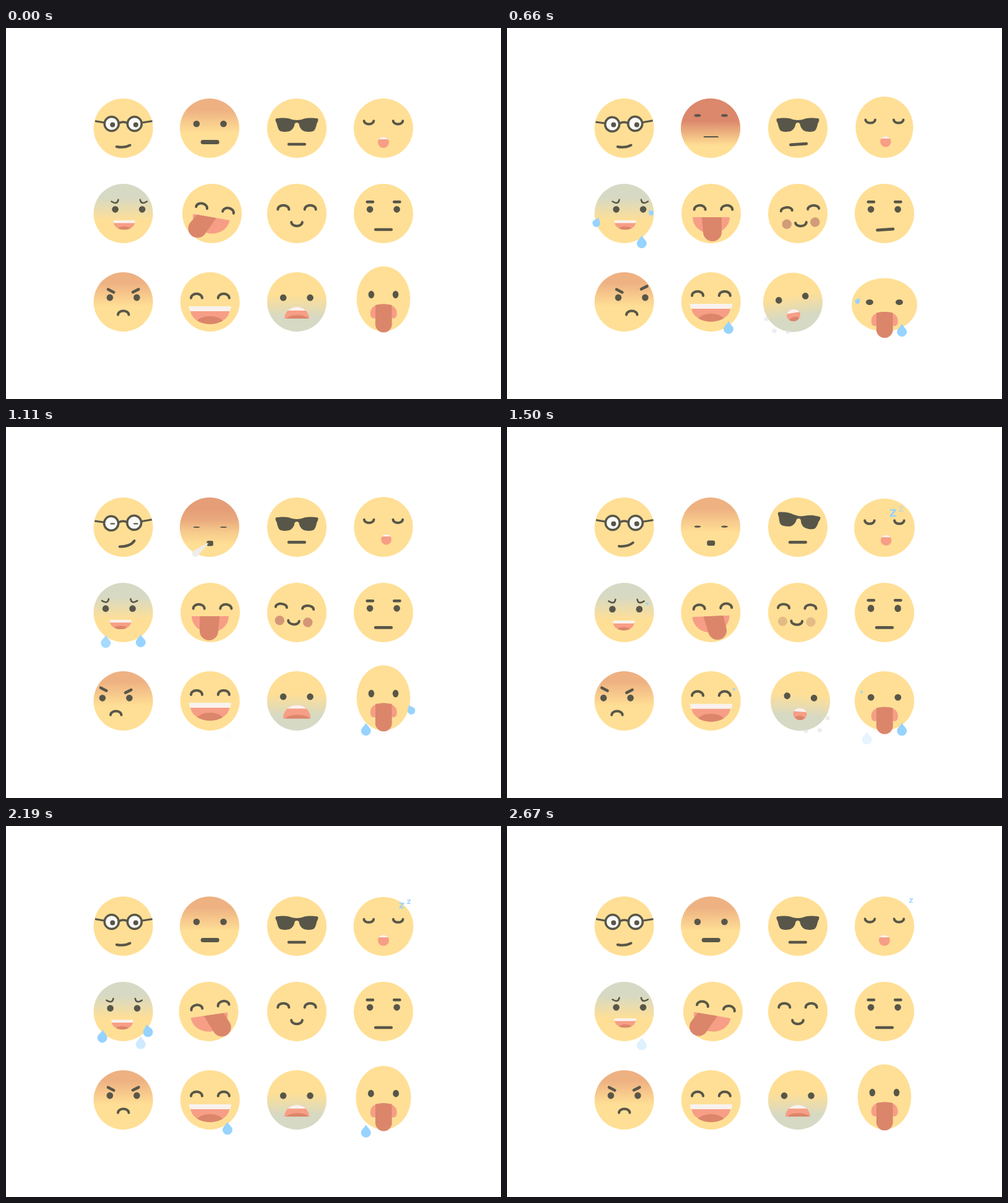
An HTML page with a canvas that plays this animation: 800x600 px, repeating every 2.7 s.

```html
<!DOCTYPE html>
<html lang="en">
<head>
<meta charset="utf-8">
<title>Twelve faces</title>
<style>
html, body { margin: 0; width: 100%; height: 100%; overflow: hidden; background: #fff; }
canvas { display: block; width: 800px; height: 600px; }
</style>
</head>
<body>
<canvas id="stage" width="800" height="600"></canvas>
<script>
const g = document.getElementById('stage').getContext('2d');
const LOOP = 2700, STEP = 30, PI = Math.PI;
const SKIN = '#ffdf95', INK = '#585649', PINK = '#f79e86', TONGUE = '#db866b',
  TEETH = '#f9f2ee', WATER = '#96d3ff', ORANGE = '#eeb182', RED = '#db886c', GREEN = '#d6d9c4';

const clamp = u => Math.min(1, Math.max(0, u));
const ramp = (t, a, b) => { const u = clamp((t - a) / (b - a)); return u * u * (3 - 2 * u); };
// Eases 0 to 1 over a..b, stays, and eases back over c..d.
const hold = (t, a, b, c, d) => ramp(t, a, b) - ramp(t, c, d);
const wave = (t, period) => Math.cos(2 * PI * t / period);

function at(x, y, rot, draw, scale = 1) {
  g.save();
  g.translate(x, y);
  g.rotate(rot);
  g.scale(scale, scale);
  draw();
  g.restore();
}
function faded(alpha, draw) {
  g.globalAlpha = clamp(alpha);
  draw();
  g.globalAlpha = 1;
}
function oval(x, y, rx, ry, fill) {
  g.beginPath();
  g.ellipse(x, y, rx, ry, 0, 0, 2 * PI);
  g.fillStyle = fill;
  g.fill();
}
function shape(d, fill) {
  g.fillStyle = fill;
  g.fill(new Path2D(d));
}
function line(d, width = 4, cap = 'round') {
  g.strokeStyle = INK;
  g.lineWidth = width;
  g.lineCap = cap;
  g.stroke(new Path2D(d));
}
function pill(x, y, w, h, r, fill) {
  g.beginPath();
  g.roundRect(x, y, w, h, r);
  g.fillStyle = fill;
  g.fill();
}
function arch(x, y, rx, ry, up) {
  g.beginPath();
  g.ellipse(x, y, rx, ry, 0, PI, 0, !up);
  g.strokeStyle = INK;
  g.lineWidth = 4;
  g.lineCap = 'round';
  g.stroke();
}
function eyes(x, y, gap = 21.75, rx = 5.3, ry = 5.4) {
  for (const side of [-1, 1]) oval(x + side * gap, y, rx, ry, INK);
}
function fade(y0, y1, from, to) {
  const f = g.createLinearGradient(0, y0, 0, y1);
  f.addColorStop(0, from);
  f.addColorStop(1, to);
  return f;
}
const ball = (x, y, fill = SKIN) => oval(x, y, 48, 48, fill);

function bowl(x, y, rx, ry, tx, ty) {
  g.save();
  g.beginPath();
  g.ellipse(x, y, rx, ry, 0, 0, PI);
  g.clip();
  oval(x, y, rx, ry, PINK);
  oval(x, y + ry, tx, ty, TONGUE);
  g.restore();
}

// A bead of sweat grows at the temple, slides round the cheek, then falls and fades.
function sweat(age, x, y, side, life = 1000) {
  if (age <= 0 || age >= life) return;
  const slide = Math.sin(PI / 2 * clamp(age / 500));
  const angle = -.52 + 1.54 * slide, r = 38 + 16 * slide;
  faded((life - age) / 250, () =>
    at(x + side * r * Math.cos(angle), y + r * Math.sin(angle) + 15 * ramp(age, 560, 1000),
      -.9 * side * (1 - slide),
      () => shape('M0-10.5C2-6 8-2 8 2.2A8 8 0 0 1-8 2.2C-8-2-2-6 0-10.5Z', WATER),
      clamp(.12 + age / 270)));
}

function nerd(t) {
  ball(189.5, 162);
  const tilt = hold(t, 300, 600, 1200, 1450);
  at(189.5 - tilt * .6, 156 + tilt * .3, -.026 * tilt, () => {
    for (const x of [-18.8, 18.3]) {
      oval(x, -1, 11.5, 11.5, '#f9f9f6');
      g.strokeStyle = INK;
      g.lineWidth = 3.5;
      g.stroke();
    }
    line('M-7-2Q0-6 7-2', 3.4);
    line('M-45.5-5.4L-31-3M31-3L47-5.4', 3, 'butt');
  });
  eyes(191, 156.4, 18.75, 4, 4 - 2.8 * hold(t, 1000, 1090, 1130, 1240));
  const m = hold(t, 680, 1050, 1250, 1720);
  line(`M${178.7 + 5 * m} ${192 + 1.5 * m}Q${191 + 10 * m} ${194.5 - m} ${200.5 + 7 * m} ${189.5 - 5.5 * m}`);
}

function steamer(t) {
  const heat = hold(t, 60, 600, 800, 1400);
  const tight = hold(t, 60, 600, 1400, 1850);
  const puff = hold(t, 720, 980, 1400, 1850);
  ball(329, 162, fade(132, 170, ORANGE, SKIN));
  faded(heat, () => ball(329, 162, fade(150, 190, RED, SKIN)));
  eyes(329.7, 155 - 13.5 * tight + 20.5 * puff, 21.8, 5.3, 5.3 - 3.1 * tight - 1.1 * puff);
  const w = 30 - 6 * tight - 13.5 * puff, h = 7 - 5 * tight + 6.5 * puff;
  pill(329.7 - w / 2, 184.5 - 8.5 * tight + 12.2 * puff - h / 2, w, h, Math.min(h / 2, w / 4), INK);
  const blow = ramp(t, 960, 1110);
  if (blow > 0) {
    faded(1 - ramp(t, 1120, 1330), () =>
      at(326.5, 188, 2.46, () => shape('M0-.8L25-5Q29-6 30-3Q33-1 31 1Q32 5 28 4.5L25 5L0 .8Z', '#efecea'), blow));
  }
}

function flatMouth(t, x, y) {
  const tip = hold(t, 300, 600, 720, 1000);
  at(x + 1.2 * tip, y - 1.6 * hold(t, 680, 1050, 1520, 1750), -.07 * tip, () => line('M-12.8 0H12.8', 4.6));
}

function cool(t) {
  ball(470, 162);
  const half = 'M0-7C8-7 12-10.5 20-10.5C28-10.5 33-9.8 34-9.2Q35.2-8 34-5L32.5-2C31 4 30 8.5 27 10.5' +
    'C24 12.3 16 12.5 11 10.5C6 8 4 3 3.5-1Q2.5-3 0-3Z';
  const tilt = hold(t, 1150, 1430, 1500, 1950);
  at(470 + 1.3 * tilt, 156 + 1.5 * tilt - 6.5 * hold(t, 1150, 1430, 1500, 1730), .115 * tilt, () => {
    shape(half, INK);
    g.scale(-1, 1);
    shape(half, INK);
  });
  flatMouth(t, 469.9, 188);
}

function sleeper(t) {
  const breath = 1.5 * hold(t, 0, 600, 680, 1330) - 1.4 * hold(t, 1150, 1720, 1780, 2400);
  const rx = 48 - breath, ry = 48 + breath;
  oval(610, 210 - ry, rx, ry, SKIN);
  for (const side of [-1, 1]) arch(610 + side * rx * .49, 150.2 - 1.2 * breath, 7.8, 5.2, false);
  const m = hold(t, 300, 1110, 1300, 1760), r = 9 - .6 * m;
  at(610 + 4.6 * m, 185 - 3 * m, 0, () => {
    oval(0, 0, r, r, PINK);
    g.beginPath();
    g.rect(-10, -10, 20, 5);
    g.clip();
    oval(0, 0, r, r, TEETH);
  });

  g.fillStyle = WATER;
  g.textAlign = 'center';
  for (let i = 0; i < 3; i++) {
    const from = 1350 + 120 * i, to = 2080 + 340 * i;
    if (t < from || t >= to) continue;
    const size = 16.5 - 3.6 * i, drift = clamp((t - from - 200) / (to - from - 200));
    g.font = `bold ${size}px "DejaVu Sans", sans-serif`;
    faded(hold(t, from, from + 60, to - 60, to), () =>
      g.fillText('Z', 624 + 12.7 * i + 4 * drift, 139 - 7 * i - 5 * drift + size * .365));
  }
}

function nervous(t) {
  ball(189.5, 300, fade(274, 312, GREEN, SKIN));
  const look = 8.5 * (Math.sin(PI / 2 * wave(t, 675)) - 1);
  const dip = Math.sin(PI * -look / 17);
  at(198.8 + look, 281 + 1.3 * dip, 0, () =>
    line('M-28.3-.5Q-19 5.5-17.3-3.3M29-.5Q19.7 5.5 18-3.3', 2.6));
  eyes(198.3 + look, 293.3 + 1.5 * dip);
  const mx = 191 + look * .38, my = 311 + 2.3 * dip;
  bowl(mx, my + 4, 17, 11.3 + .6 * dip, 11.5, 5.5);
  pill(mx - 17.5, my, 35, 4.6, [1, 1, 2, 2], TEETH);
  for (const cycle of [0, LOOP / 2]) {
    sweat(t - cycle - 120, 189.5, 300, 1, 840);
    sweat(t - cycle - 560, 189.5, 300, 1, 840);
    sweat(t - cycle - 480, 189.5, 300, -1, 840);
  }
}

function goofy(t) {
  const c = wave(t, 900), lean = c * Math.abs(c);
  at(330 + 3 * lean, 300, lean * PI / 18, () => {
    ball(0, 0);
    arch(-18.3, -6.3, 9, 7, true);
    arch(25.3, -6.3, 9, 7, true);
    g.beginPath();
    g.ellipse(0, 6, 30, 26.5, 0, 0, PI);
    g.fillStyle = PINK;
    g.fill();
    const top = -8 * c, x = -19 * c, y = 30 - 2 * c * c;
    const a = Math.atan2(y - 6, x - top);
    g.beginPath();
    g.moveTo(top - 16, 6);
    g.lineTo(top + 16, 6);
    g.arc(x, y, 15, a - PI / 2, a + PI / 2);
    g.fillStyle = TONGUE;
    g.fill();
  });
}

function shy(t) {
  ball(470, 300);
  const d = hold(t, 150, 600, 680, 1080) - hold(t, 680, 1080, 1160, 1720);
  const squash = 1.3 * Math.abs(d);
  at(470 + 4 * d, 300 + .6 * d, -.07 * d, () => {
    faded(.6 * hold(t, 250, 800, 1150, 1720), () => eyes(0, 15, 22.8, 7.6, 7.6), g.fillStyle);
    for (const side of [-1, 1]) {
      faded(.6 * hold(t, 250, 800, 1150, 1720), () => oval(side * 22.8, 15, 7.6, 7.6, '#fa9c84'));
      arch(side * 21.7, -6.5, 9, 6.8 - squash, true);
    }
    arch(0, 14, 8.8, 6.2 - squash * .3, false);
  });
}

function neutral(t) {
  ball(610, 300);
  const lift = hold(t, 1150, 1450, 1520, 1750);
  at(610, 281.2 - lift, 0, () => line('M-26.3 0H-17M17.2 0H26.5', 4.5));
  eyes(609.9, 293.3, 21.75, 5.3, 5.4 + .5 * lift);
  flatMouth(t, 610, 326);
}

function angry(t) {
  ball(189.5, 443, fade(412, 451, ORANGE, SKIN));
  const right = hold(t, 120, 520, 700, 1000), left = hold(t, 700, 1000, 1480, 1740);
  const d = 12 * (right - left);
  eyes(189.6 + d, 436 + 2.3 * left);
  at(189.5 + d, 425, 0, () =>
    line(`M-24.5 ${-2.3 - left}l9.2 4.8M15.5 ${2.3 - 5 * right + 2.5 * left}l9.3-4.7`, 4.6));
  arch(189.7 + d, 463.8 + 2 * left, 8.7, 6.3, true);
}

function laugher(t) {
  ball(329.7, 443);
  at(329.7, 443 - (1 - wave(t, 450)) ** 2, 0, () => {
    arch(-21.7, -6.2, 9, 7, true);
    arch(22.1, -6.2, 9, 7, true);
    bowl(0, 13, 31.8, 23, 23, 13);
    shape('M-34.2 7H34.3Q34.3 11 32.3 15H-32.2Q-34.2 11-34.2 7Z', TEETH);
  });
  for (const cycle of [0, LOOP / 2]) sweat(t - cycle - 120, 329.7, 438.5, 1);
}

function puffs(t, start, x, y, side) {
  const p = (t - start) / 250;
  if (p <= 0 || p >= 1) return;
  for (let i = 0; i < 3; i++) {
    const a = .15 + .55 * i, r = (45 - 4 * i * i) * (.6 + .8 * p);
    faded(1 - p * .9, () => oval(x + side * r * Math.cos(a), y + r * Math.sin(a), 3.6, 3.4, '#e0dde5'));
  }
}

function sick(t) {
  const dx = 4.2 * hold(t, 1200, 1430, 1460, 1860) - 8 * hold(t, 440, 610, 670, 860);
  const rot = .02 * dx;
  at(470 + dx, 443 + .08 * Math.abs(dx), rot, () => {
    ball(0, 0, fade(-12, 25, SKIN, GREEN));
    eyes(-.2, -6.8);
    const small = hold(t, 150, 560, 700, 1050) + hold(t, 1180, 1400, 1530, 1900);
    const gape = hold(t, 700, 1050, 1180, 1400);
    const w = 20 - 9 * small + 2.3 * gape, up = 19 - 9.5 * small + 3 * gape;
    at(14 * rot, 27 - 6.5 * small + 1.4 * gape, 0, () => {
      g.beginPath();
      g.ellipse(0, 0, w, up, 0, PI, 2 * PI);
      g.ellipse(0, 0, w, .1 + 10 * small, 0, 0, PI);
      g.clip();
      g.fillStyle = PINK;
      g.fillRect(-30, -30, 60, 60);
      oval(w * .05, 1 + 9 * small, w * .88, 6.8, TONGUE);
      g.fillStyle = TEETH;
      g.fillRect(-30, -up, 60, 6);
    });
  });
  puffs(t, 540, 463, 464, -1);
  puffs(t, 1375, 474, 464, 1);
}

function panter(t) {
  const s = 2 * (hold(t, 0, 600, 680, 1100) + hold(t, 1250, 1750, 1800, 2300)) - 1;
  const ry = 47.9 - 4.7 * s;
  oval(610, 490.8 - ry, 48.1 + 4.8 * s, ry, SKIN);
  eyes(610, 437.3 + 6.2 * s, 21.8 + 2.2 * s, 5.4 + .6 * s, 5.3 - .8 * s);
  at(610.3, 452.8 + 6.2 * s, 0, () => {
    shape('M-21.5 15C-21.5 4-12 0 0 0S21.5 4 21.5 15C21.5 20.5 19 23.5 15 23Q0 18-15 23C-19 23.5-21.5 20.5-21.5 15Z', PINK);
    const end = 30.5 - 1.8 * s;
    shape(`M-13.2 1.5Q0-1.5 13.2 1.5L13.4 ${end}A13.4 13.4 0 0 1-13.4 ${end}Z`, TONGUE);
  });
  for (const birth of [560, 1470]) sweat(t - birth, 610, 443, -1);
  for (const birth of [100, 930]) sweat(t - birth, 610, 443, 1);
}

const faces = [nerd, steamer, cool, sleeper, nervous, goofy, shy, neutral, angry, laugher, sick, panter];

function frame() {
  const t = Math.floor(performance.now() % LOOP / STEP) * STEP;
  g.fillStyle = '#fff';
  g.fillRect(0, 0, 800, 600);
  for (const draw of faces) draw(t);
  requestAnimationFrame(frame);
}
frame();
</script>
</body>
</html>
```
